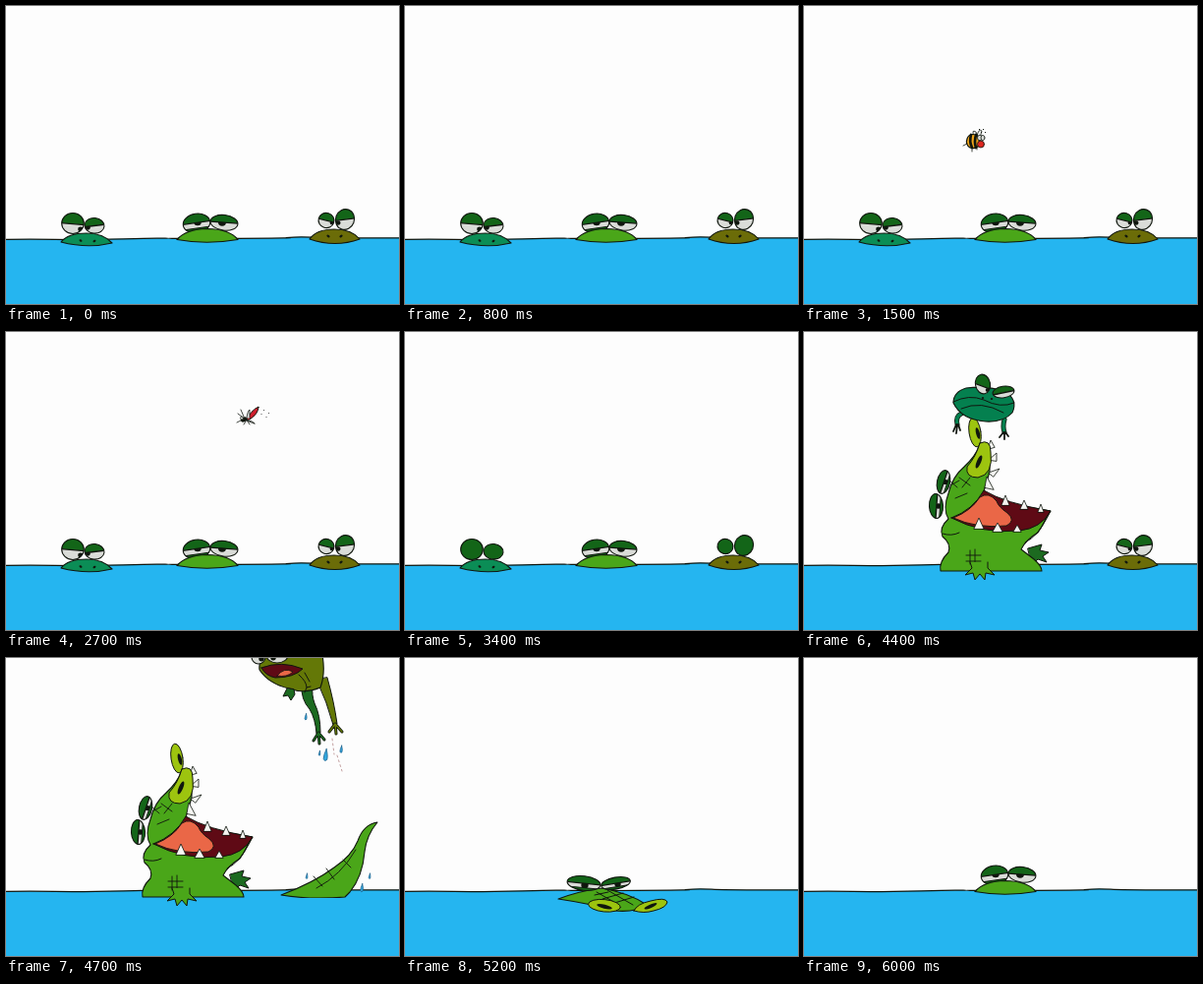
Animation, 400 px wide and 303 px high, one loop 6.4 s. Source, as an HTML page with a canvas:

```html
<!DOCTYPE html>
<html lang="en">
<head>
<meta charset="utf-8">
<title>Pond</title>
<style>
html, body { margin: 0; width: 100%; height: 100%; overflow: hidden; background: #fdfdfd; }
canvas { display: block; width: 100vw; height: 100vh; }
</style>
</head>
<body>
<canvas id="stage" width="400" height="303"></canvas>
<script>
const ctx = document.getElementById('stage').getContext('2d');
const INK = '#10160e', LID = '#136518', WHITE = '#dadcd8', WATER = '#25b5f0';
const TEAL = '#0b8d56', DEEP_TEAL = '#04804f', GREEN = '#4aa619', OLIVE = '#6b6c08', MOSS = '#647807';
const LIME = '#9dc40f', DARK = '#1c6a20', MOUTH = '#5f0a15', TONGUE = '#ea6747';
const LOOP = 6400, STEP = 100;

function shape(d, fill, width = 1, ink = INK) {
  const p = new Path2D(d);
  if (fill) { ctx.fillStyle = fill; ctx.fill(p); }
  if (width) { ctx.lineWidth = width; ctx.strokeStyle = ink; ctx.stroke(p); }
}

function limb(d, width, fill) {
  shape(d, null, width + 1.6);
  shape(d, null, width, fill);
}

function oval(x, y, rx, ry, turn, fill, width = 1) {
  ctx.beginPath();
  ctx.ellipse(x, y, rx, ry, turn, 0, Math.PI * 2);
  if (fill) { ctx.fillStyle = fill; ctx.fill(); }
  if (width) { ctx.lineWidth = width; ctx.strokeStyle = INK; ctx.stroke(); }
}

function at(dx, dy, draw) {
  ctx.save();
  ctx.translate(dx, dy);
  draw();
  ctx.restore();
}

// Draws only what is above the given depth, so bodies can rise and sink.
function above(depth, draw) {
  ctx.save();
  ctx.beginPath();
  ctx.rect(0, 0, 400, depth);
  ctx.clip();
  draw();
  ctx.restore();
}

// lid and under are the lid edges: -1 top of the eye, 1 bottom.
function eye(x, y, rx, ry, { turn = 0, lid = 0, tilt = 0, px = 0, py = 2, pupil = 2.4, blink = 0, under = 2 }) {
  ctx.save();
  oval(x, y, rx, ry, turn, WHITE, 0);
  ctx.clip();
  oval(x + px, y + py, pupil * 1.15, pupil, 0, INK, 0);
  ctx.translate(x, y);
  ctx.rotate(tilt);
  const edge = ry * (lid + (1 - lid) * blink);
  ctx.fillStyle = LID;
  ctx.fillRect(-30, -40, 60, 40 + edge);
  if (under < 1) ctx.fillRect(-30, ry * under, 60, 30);
  ctx.fillStyle = INK;
  ctx.fillRect(-30, edge - 0.5, 60, 1.3);
  if (under < 1) ctx.fillRect(-30, ry * under - 0.4, 60, 0.9);
  ctx.restore();
  oval(x, y, rx, ry, turn, null, 1.1);
}

function water() {
  ctx.fillStyle = '#fdfdfd';
  ctx.fillRect(0, 0, 400, 303);
  shape('M-2 237.4Q25 236.9 50 237.4T120 236.8T165 236.2T235 236.3T285 235.6Q298 234.3 312 235.2T402 235.8V306H-2Z', WATER, 1.2);
}

function drop(x, y, size = 4) {
  at(x, y, () => {
    ctx.scale(size * .75, size);
    shape('M.3 -1.3Q.8 .2 .45 .9Q-.2 1.4 -.5 .7Q-.5 0 .3 -1.3Z', '#34a9e0', 0.8 / size, '#195b86');
  });
}
const drops = list => list.forEach(([x, y, size]) => drop(x, y, size));

function tealHead(blink) {
  eye(68, 221, 11.3, 10.5, { lid: .05, tilt: .08, px: 8, py: 6, blink });
  eye(90, 223.3, 10, 7.8, { turn: .1, lid: 0, tilt: -.12, px: -7, py: 2, blink });
  shape('M56 240Q63 231 82 231Q99 231 108 241Q83 247 56 240Z', TEAL, 1.2);
  oval(76, 238.5, 1.6, 1.1, .6, INK, 0);
  oval(90, 239, 1.6, 1.1, -.6, INK, 0);
}

function oliveHead(blink) {
  eye(326, 218, 8, 7.6, { turn: .3, lid: 0, tilt: .25, px: 6, py: 2.5, pupil: 2, blink });
  eye(345, 217, 9.5, 10.5, { turn: .35, lid: 0, tilt: -.12, px: -7, py: 3.5, pupil: 2.2, blink });
  shape('M309 237Q316 227 334 227Q352 227 360 237Q335 246 309 237Z', OLIVE, 1.2);
  oval(328, 234, 1.8, 1.1, .6, INK, 0);
  oval(341, 234, 1.8, 1.1, -.6, INK, 0);
}

function crocHead(blink) {
  eye(194, 221, 13.8, 9.8, { turn: -.15, lid: -.08, tilt: -.14, px: 1, py: -1, pupil: 3.2, blink, under: .5 });
  eye(222, 220.3, 14, 7.8, { turn: .12, lid: -.04, tilt: .07, px: -2, py: 0, pupil: 3.4, blink });
  shape('M174 237.5Q183 227 205 226.5Q228 227 236 237.5Q204 243 174 237.5Z', GREEN, 1.2);
}

function bee(x, y) {
  at(x, y, () => {
    shape('M-2 -6Q-5 -13 0 -10L2 -5M1 -6Q3 -14 6 -11L4 -4', '#eef0ee', .8);
    shape('M-9 -3Q-7 -9 0 -7Q5 -4 3 4Q-1 8 -6 6Q-11 3 -9 -3Z', '#f0a51b', 1.2);
    shape('M-5 -7Q-7 0 -4 6M0 -7Q-2 0 0 6', null, 2.7);
    oval(4, -4, 2.5, 2.8, 0, WHITE, .8);
    oval(7, -4, 2, 2.6, 0, WHITE, .8);
    oval(5, 2.5, 3.5, 3.5, 0, '#df2720', .8);
    shape('M-9 2L-13 4M-4 7V10M1 6V8', null, .8);
    ctx.fillStyle = INK;
    for (let i = 0; i < 4; i++) ctx.fillRect(3 + i * 2, -13 + (i % 2) * 3, 1, 1);
  });
}

function mosquito(x, y) {
  at(x, y, () => {
    shape('M2 1Q6 -8 14 -12Q14 -5 5 1Z', '#cf1d2c', 1);
    shape('M2 -1Q3 -8 5 -9L5 0M2 2Q8 2 10 5Z', '#e2e2e2', .8);
    oval(-1, 1, 3.3, 2.4, -.4, INK, 0);
    oval(-3, -.5, 1.5, 1.5, 0, WHITE, .7);
    shape('M-4 2L-8 4M-3 -2L-7 -5M-1 -2L-4 -9M1 3L-1 6M3 3L5 6', null, .8);
    ctx.fillStyle = '#555';
    for (let i = 0; i < 5; i++) ctx.fillRect(14 + i * 2.5, -12 + (i * 7) % 11, 1, 1);
  });
}

function tealFrog() {
  limb('M70 113Q64 116 66 124M114 119Q112 126 114 132', 3.4, DEEP_TEAL);
  shape('M65 124L62 131M66 124L65 133M67 124L69 130M113 132L109 137M114 132V139M115 132L118 136', null, 1.8);
  shape('M62 102Q62 91 75 87Q98 84 115 91Q128 99 122 112Q113 122 95 121Q70 119 62 102Z', DEEP_TEAL, 1.1);
  shape('M62 101Q78 93 93 99Q110 108 124 102M70 108Q90 99 113 112', null, 1);
  eye(92, 83, 7.5, 10, { turn: -.2, lid: .2, tilt: .35, px: 5, py: 6, pupil: 2 });
  eye(113, 91, 11, 5.8, { turn: -.15, lid: .1, tilt: -.2, px: -7, py: 1, pupil: 1.8 });
  oval(92, 97, 1.2, .9, 0, INK, 0);
  oval(101, 98, 1.2, .9, 0, INK, 0);
}

function grinningCroc() {
  shape('M134 226L120 229L118 233L123 233L122 237L129 235L133 238Z', DARK);
  shape('M73 124Q84 121 103 131Q140 148 188 157Q212 161 220 172Q221 183 216 187Q229 198 237 220Q241 233 242 245H128L133 237Q114 218 98 194Q83 165 78 138Q78 129 73 124Z', GREEN, 1.1);
  shape('M102 138Q123 157 158 167Q183 172 205 171Q204 182 187 184Q158 184 132 169Q114 157 102 138Z', '#f0f0ec', 1.1);
  shape('M109 146L114 153L119 152L122 160L128 157L133 168L139 161L145 174L151 166L158 180L165 169L173 182L180 171L189 182L196 171L201 178', null, 1);
  shape('M203 168Q209 168 207 175M78 126Q91 126 104 139M215 188Q211 193 212 198', null, 1);
  shape('M140 143L145 155M139 151L149 149M163 149L166 160M161 156L170 154M212 188L220 193M220 208L230 203M226 223L237 218M229 238L240 234', null, .9);
  shape('M200 222V235M207 222V236M197 226H213M197 232H214', null, .9);
  shape('M194 235L193 242L187 246L195 245L196 249L201 244L205 249L207 244L215 246L210 241L210 235', GREEN, 1);
  eye(192, 148, 12, 9, { turn: .4, lid: .25, tilt: .35, px: 2, py: 3, pupil: 2.8, under: .75 });
  eye(215, 160, 13, 7, { turn: .15, lid: .35, tilt: .1, px: -5, py: 3, pupil: 2.2, under: .7 });
}

function crocNostrils() {
  oval(77, 113, 6, 10, -.55, LIME);
  oval(103, 121, 14, 6, .35, LIME);
  oval(77, 115, 1.6, 4, -.55, INK, 0);
  oval(103, 121, 5.5, 1.6, .35, INK, 0);
}

const tooth = (x, y, w, h, lean = 0) =>
  shape(`M${x - w} ${y}L${x + lean} ${y - h}L${x + w} ${y}Z`, '#f6f6f2', .8);

function gapingCroc() {
  shape('M228 220L242 216L240 222L249 224L243 228L247 234L238 231L232 237Z', DARK);
  shape('M178 116Q190 122 189 142L183 162Q192 168 206 174L251 182Q243 197 238 204Q226 211 221 221L234 231Q242 238 242 243H139Q137 234 147 224Q150 215 141 208Q137 199 147 190Q141 180 147 164Q151 147 163 137Q175 126 178 116Z', GREEN, 1.1);
  shape('M150 189Q172 181 183 161Q204 174 251 182Q241 200 219 202Q182 206 150 189Z', MOUTH, 1);
  shape('M152 189Q170 182 179 168Q188 162 196 172Q198 178 207 184Q216 192 206 197Q175 200 152 189Z', TONGUE, .9);
  shape('M141 205Q150 208 158 204M225 214Q239 207 246 190', null, 1);
  [[178, 200, 5, 11], [197, 203, 5, 9], [217, 203, 4, 7], [205, 176, 4, 10], [224, 180, 4, 9], [241, 183, 3, 8]]
    .forEach(t => tooth(...t));
  shape('M187 119L190 110L194 117ZM188 130L196 123L196 131ZM184 158L186 147L193 160Z', '#f6f6f2', .8);
  shape('M188 143L199 139L193 147Z', '#f6f6f2', .8);
  oval(174, 102, 6, 15, -.15, LIME);
  shape('M179 113Q190 108 190 122Q193 145 177 148Q164 148 166 137Q175 127 179 113Z', LIME);
  oval(177, 103, 1.9, 6, -.25, INK, 0);
  oval(178, 132, 2.2, 7, .4, INK, 0);
  shape('M146 149L156 158M151 155L158 151M154 169L166 164M158 148L169 156M161 158L169 148M169 222V236M174 221V234M165 227H180M165 233H180', null, .9);
  shape('M169 234L171 240L164 247L172 245L174 252L179 246L184 252L185 245L194 247L187 240L187 234', GREEN, 1);
  eye(142, 152.5, 6.5, 12, { turn: .2, lid: .02, tilt: -1.25, px: 2, pupil: 2.6, py: 0, under: .32 });
  eye(134.5, 177, 7, 12.5, { turn: -.05, lid: .02, tilt: -1.5, px: 2.2, pupil: 2.8, py: 0, under: .32 });
}

function tail() {
  shape('M280 241Q314 228 334 213Q352 201 358 186Q364 169 378 167Q367 180 365 197Q363 222 350 238L345 243Q310 246 280 241Z', GREEN, 1.1);
  shape('M316 234Q341 221 356 195M313 222L322 232M326 214L334 225M343 205L351 213', null, .9);
}

function oliveFrog() {
  shape('M301 28Q300 42 309 52Q315 62 316 77L320 76Q320 58 314 46Q311 38 312 28Z', DARK);
  shape('M316 22Q327 45 333 68L337 67Q334 45 327 20Z', MOSS);
  limb('M318 76L313 84M318 76L319 87M318 76L324 83', 1.4, DARK);
  limb('M335 67L329 75M335 67L336 77M335 67L342 75', 1.4, MOSS);
  shape('M258 12Q256 -4 280 -8H321Q326 14 320 30Q304 37 288 31Q267 26 258 12Z', MOSS, 1.1);
  shape('M260 10Q280 2 302 11Q293 20 274 20Q264 18 260 10Z', MOUTH, 1);
  shape('M276 18Q283 9 292 14Q286 20 276 18Z', TONGUE, .8);
  shape('M286 31L282 39L287 38L290 43L294 37L293 32Z', DARK);
  shape('M298 17Q306 24 306 30L310 29M306 30L304 35M304 15L309 24', null, 1);
  eye(257, -1, 7, 7, { lid: -.4, px: 3, py: 2 });
  eye(276, -3, 11, 8, { lid: -.4, px: -4, py: 3 });
}

function surfacedSnout() {
  shape('M156 245Q177 237 200 234Q229 239 246 251Q235 259 213 257Q190 250 156 245Z', GREEN, 1.1);
  shape('M193 241L207 238M201 245L222 239M210 250L233 243M206 236L232 251M195 238L216 250', null, 1);
  eye(182, 229, 17, 7.3, { turn: .12, lid: 0, tilt: .1, px: 1, py: 2, pupil: 3.2, under: .62 });
  eye(214.5, 229, 15, 6, { turn: -.18, lid: 0, tilt: -.16, px: 2, py: 1, pupil: 2.8, under: .62 });
  oval(203, 251.8, 16.5, 6.2, .1, LIME);
  shape('M233 257Q236 250 250 247Q265 243 267 248Q266 254 253 257Q243 260 233 257Z', LIME);
  oval(203, 252.8, 8, 2, .25, INK, 0);
  oval(250, 252.3, 7, 1.8, -.4, INK, 0);
}

// Half, shut, half, open again, beginning at the given step.
const blinkAt = (k, start) => [.5, 1, .5][k - start] || 0;

function waiting(k) {
  tealHead(blinkAt(k, 2) || blinkAt(k, 33));
  crocHead(0);
  oliveHead((k === 7 ? 1 : 0) || blinkAt(k, 33));
  const flight = n => 12 + 18.1 * n + 2.9 * n * n;
  if (k >= 10 && k < 19) bee(flight(k - 10), 138 + 2 * Math.sin((k - 15) * 1.3));
  if (k >= 22 && k < 31) mosquito(400 - flight(k - 22) + 18, 88 + 5 * Math.sin((k - 27) * 1.1));
}

function lifting(k) {
  oliveHead(0);
  above(k === 40 ? 245 : 255, () => at(0, k === 40 ? 62 : 0, () => {
    grinningCroc();
    at(0, k === 42 ? -70 : 0, tealFrog);
    crocNostrils();
  }));
  drops([[64, 168, 3.8], [72, 185, 6.8], [85, 195, 5], [58, 196, 2.5]]);
}

function feeding(k) {
  const tealPath = { 43: [40, -95], 44: [90, -30], 45: [112, 50] };
  const olivePath = { 46: [0, 115], 47: [0, 0], 49: [-50, -5], 50: [-75, 115] };
  if (k < 46) oliveHead(0);
  if (k >= 46 && k < 49) above(244, () => at(0, [25, 0, 35][k - 46], tail));
  gapingCroc();
  if (tealPath[k]) at(...tealPath[k], tealFrog);
  if (olivePath[k]) at(...olivePath[k], oliveFrog);
  if (k === 47) {
    drops([[305, 60, 2.6], [325, 99, 5], [319, 97, 2], [341, 93, 3], [306, 222, 2.2], [370, 222, 2.2], [362, 234, 3.4]]);
    ctx.setLineDash([2, 3]);
    shape('M332 82L334 98M337 99L342 115', null, .7, '#a77');
    ctx.setLineDash([]);
  }
}

function sinking(k) {
  if (k === 51) {
    above(245, () => at(400, 55, () => {
      ctx.scale(-1, 1);
      grinningCroc();
      crocNostrils();
    }));
  } else if (k === 52) {
    surfacedSnout();
  } else {
    crocHead(0);
    drops([[74, 214, 3], [112, 187, 3], [322, 188, 3], [354, 208, 3]]);
  }
}

function draw(time) {
  const k = Math.floor((time % LOOP) / STEP);
  ctx.lineJoin = ctx.lineCap = 'round';
  water();
  if (k < 40) waiting(k);
  else if (k < 43) lifting(k);
  else if (k < 51) feeding(k);
  else if (k < 54) sinking(k);
  else crocHead(blinkAt(k, 57));
}

const start = performance.now();
function tick() {
  draw(performance.now() - start);
  requestAnimationFrame(tick);
}
tick();
</script>
</body>
</html>
```
